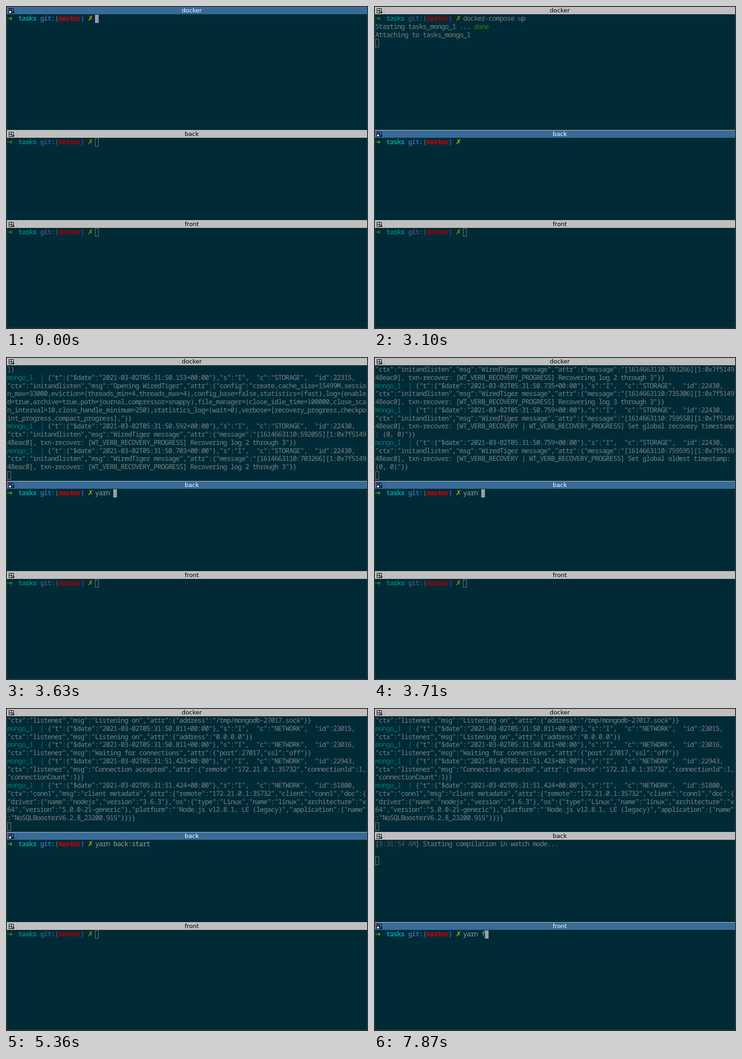
Write an HTML page that moves like this. It is 793 by 706 pixels and loops after 8 s.

```html
<!DOCTYPE html>
<html lang="en">
<head>
<meta charset="utf-8">
<title>Terminal panes</title>
<style>
  html, body { margin: 0; width: 100%; height: 100%; overflow: hidden; background: #002b36; }
  .pane { position: absolute; left: 0; width: 793px; }
  .bar {
    position: absolute; left: 2px; width: 789px; height: 16px;
    background: #c0bebe; color: #000;
    font: 13px/16px "DejaVu Sans", sans-serif; text-align: center; text-indent: 21px;
  }
  .bar::before {
    content: ""; position: absolute; left: 21px; top: 0; width: 1px; height: 100%;
    background: rgba(0, 0, 0, .1);
  }
  .bar svg { position: absolute; left: 4px; top: 3px; shape-rendering: crispEdges; }
  .tile { fill: none; }
  .active .bar { background: #386b98; color: #fff; }
  .active .red { fill: #e01010; }
  .active .blue { fill: #1e78dc; }
  .active .white { fill: #fff; }
  .split .bar { box-shadow: 0 -1px #c8c8c8; }
  .rows {
    position: absolute; left: 2.6px; top: 17px; color: #93a1a1; white-space: pre;
    font: 15px/17.77px "Noto Sans Mono", "DejaVu Sans Mono", monospace;
    letter-spacing: -.98px; text-rendering: geometricPrecision;
    filter: brightness(.8);
  }
  .active .rows { filter: none; }
  .rows div { height: 17.77px; }
  .cursor {
    display: inline-block; box-sizing: border-box; width: 8px; height: 18px;
    vertical-align: top; border: 1px solid #93a1a1;
  }
  .active .cursor { background: #93a1a1; }
  .active .off { visibility: hidden; }
  .sign {
    display: inline-block; width: 8.02px; line-height: 0; letter-spacing: 0;
    font-family: "DejaVu Sans", sans-serif; font-size: 15px;
  }
  .green { color: #4e9a06; }
  .cyan { color: #06989a; }
  .navy { color: #3465a4; }
  .crimson { color: #cc0000; }
  .yellow { color: #c4a000; }
  .grey { color: #657070; }
  #edge {
    position: absolute; left: 0; top: 0; width: 793px; height: 706px;
    box-shadow: inset 0 0 0 1px #0a0c0d, inset 0 0 0 2px #515c60;
  }
</style>
</head>
<body>
<div id="edge"></div>
<script>
const LOOP = 8000, COLS = 98, VISIBLE = 13;
const paint = (color, text) => `<span class="${color}">${text}</span>`;
const bold = html => `<b>${html}</b>`;

const PROMPT = bold(paint('green sign', '➜') + '  ' + paint('cyan', 'tasks') + ' ' +
  paint('navy', 'git:(') + paint('crimson', 'master') + paint('navy', ')') + ' ' +
  paint('yellow sign', '✗')) + ' ';

const panes = [['docker', 2], ['back', 272], ['front', 469]].map(([title, top], i) => {
  const el = document.createElement('div');
  el.className = i ? 'pane split' : 'pane';
  el.style.top = top + 'px';
  el.innerHTML = `<div class="bar"><svg width="14" height="13" stroke="#000">
    <path class="tile red" d="M.5 .5h5v5h-5z"/><path class="tile blue" d="M5.5 .5h5v5h-5z"/>
    <path class="tile white" d="M.5 5.5h5v5h-5z"/><path fill="none" d="M5.5 10.5h2M10.5 5.5v2"/>
    <path stroke="none" d="M7 8h6l-3 3.5z"/></svg>${title}</div><div class="rows"></div>`;
  document.body.append(el);
  return { el, rows: el.lastChild, html: '' };
});

// Database log entries
const entry = (sec, part, id, ctx, msg) =>
  `mongo_1  | {"t":{"$date":"2021-03-02T05:31:${sec}+00:00"},"s":"I",  ` +
  `"c":"${part}",`.padEnd(16) + `"id":${id},`.padEnd(14) + `"ctx":"${ctx}","msg":"${msg}}`;
const recover = (us, text, verb = 'WT_VERB_RECOVERY_PROGRESS') =>
  entry('50.' + us.slice(0, 3), 'STORAGE', 22430, 'initandlisten',
    `WiredTiger message","attr":{"message":"[1614663110:${us}][1:0x7f514948eac0], txn-recover: [${verb}] ${text}"}`);
const both = 'WT_VERB_RECOVERY | WT_VERB_RECOVERY_PROGRESS';

const dockerLog = [
  [3060, 'Attaching to tasks_mongo_1'],
  [3110, entry('50.149', 'CONTROL', 23285, 'main', `Automatically disabling TLS 1.0, to force-enable TLS 1.0 specify --sslDisabledProtocols 'none'"`)],
  [3110, entry('50.152', 'CONTROL', 4615611, 'initandlisten', 'MongoDB starting","attr":{"pid":1,"port":27017,"dbPath":"/data/db","architecture":"64-bit"}')],
  [3150, entry('50.153', 'STORAGE', 22270, 'initandlisten', 'Storage engine to use detected by data files","attr":{"dbpath":"/data/db","storageEngine":"wiredTiger"}')],
  [3150, entry('50.153', 'STORAGE', 22297, 'initandlisten', 'Using the XFS filesystem is strongly recommended with the WiredTiger storage engine. See http://dochub.mongodb.org/core/prodnotes-filesystem","tags":["startupWarnings"]')],
  [3150, entry('50.153', 'STORAGE', 22315, 'initandlisten', 'Opening WiredTiger","attr":{"config":"create,cache_size=15499M,session_max=33000,eviction=(threads_min=4,threads_max=4),config_base=false,statistics=(fast),log=(enabled=true,archive=true,path=journal,compressor=snappy),file_manager=(close_idle_time=100000,close_scan_interval=10,close_handle_minimum=250),statistics_log=(wait=0),verbose=[recovery_progress,checkpoint_progress,compact_progress],"}')],
  [3550, recover('592055', 'Recovering log 2 through 3')],
  [3590, recover('703266', 'Recovering log 2 through 3')],
  [3670, recover('735306', 'Recovering log 3 through 3')],
  [3710, recover('759558', 'Set global recovery timestamp: (0, 0)', both)],
  [3710, recover('759595', 'Set global oldest timestamp: (0, 0)', both)],
  [3750, entry('50.787', 'STORAGE', 22262, 'initandlisten', 'Timestamp monitor starting"')],
  [3750, entry('50.801', 'STORAGE', 20536, 'initandlisten', 'Flow Control is enabled on this deployment"')],
  [3750, entry('50.809', 'FTDC', 20625, 'initandlisten', 'Initializing full-time diagnostic data capture","attr":{"dataDirectory":"/data/db/diagnostic.data"}')],
  [3750, entry('50.811', 'NETWORK', 23015, 'listener', 'Listening on","attr":{"address":"/tmp/mongodb-27017.sock"}')],
  [3750, entry('50.811', 'NETWORK', 23015, 'listener', 'Listening on","attr":{"address":"0.0.0.0"}')],
  [3750, entry('50.811', 'NETWORK', 23016, 'listener', 'Waiting for connections","attr":{"port":27017,"ssl":"off"}')],
  [4400, entry('51.423', 'NETWORK', 22943, 'listener', 'Connection accepted","attr":{"remote":"172.21.0.1:35732","connectionId":1,"connectionCount":1}')],
  [4400, entry('51.424', 'NETWORK', 51800, 'conn1', `client metadata","attr":{"remote":"172.21.0.1:35732","client":"conn1","doc":{"driver":{"name":"nodejs","version":"3.6.3"},"os":{"type":"Linux","name":"linux","architecture":"x64","version":"5.0.0-21-generic"},"platform":"'Node.js v12.8.1, LE (legacy)","application":{"name":"NoSQLBoosterV6.2.8_23200.915"}}}`)],
];

const backLog = [
  [5810, bold('yarn run v1.21.1')],
  [5870, paint('grey', '$ yarn workspace back start')],
  [6190, paint('yellow', 'warning') + ' package.json: "dependencies" has dependency "@nestjs/schematics" with range "^7.2.8" that'],
  [6190, 'collides with a dependency in "devDependencies" of the same name with version "^7.0.0"'],
  [6310, paint('grey', '$ nest start --watch')],
];

const hidden = [[520, 930], [2900, 3210], [4000, 4350], [5360, 5690], [6860, 6926]];

// Text typed so far; from the completion time on, the whole text
const typed = (t, text, keys, complete = Infinity) =>
  t >= complete ? text : text.slice(0, keys.filter(k => t >= k).length);
const shown = (t, log) => log.filter(([at]) => t >= at).map(([, line]) => line);
const wrap = line => line.match(new RegExp(`.{1,${COLS}}`, 'g'))
  .map(row => row.replace(/^mongo_1  \|/, tag => paint('cyan', tag)));

function dockerRows(t) {
  const rows = [PROMPT + typed(t, 'docker-compose up', [1007, 1083, 1160], 1510)];
  if (t < 1860) return rows;
  if (t >= 2610) rows.push('Starting tasks_mongo_1 ...' + (t < 3060 ? '' : ' ' + paint('green', 'done')));
  rows.push(...shown(t, dockerLog).flatMap(wrap));
  return [...rows.slice(-VISIBLE), ''];
}

function backRows(t) {
  if (t >= 7320) return [`[${paint('grey', '8:31:54 AM')}] Starting compilation in watch mode...`, '', ''];
  if (t >= 7254) return [''];
  const rows = [PROMPT + typed(t, 'yarn back:start', [3210, 3270, 3340, 3400, 3460, 4450, 4500], 4790)];
  return t < 5750 ? rows : [...rows, ...shown(t, backLog), ''];
}

const frontRows = t => [PROMPT + typed(t, 'yarn f', [6926, 6991, 7057, 7123, 7189, 7870])];

function draw(now) {
  const t = now % LOOP;
  const focus = t < 2320 ? 0 : t < 6190 ? 1 : 2;
  const off = hidden.some(([from, to]) => t >= from && t < to);
  const cursor = `<span class="cursor${off ? ' off' : ''}"></span>`;
  [dockerRows, backRows, frontRows].forEach((build, i) => {
    const pane = panes[i];
    const html = build(t).join('</div><div>') + cursor;
    pane.el.classList.toggle('active', i === focus);
    if (html !== pane.html) pane.rows.innerHTML = `<div>${pane.html = html}</div>`;
  });
  requestAnimationFrame(draw);
}
draw(0);
</script>
</body>
</html>
```
